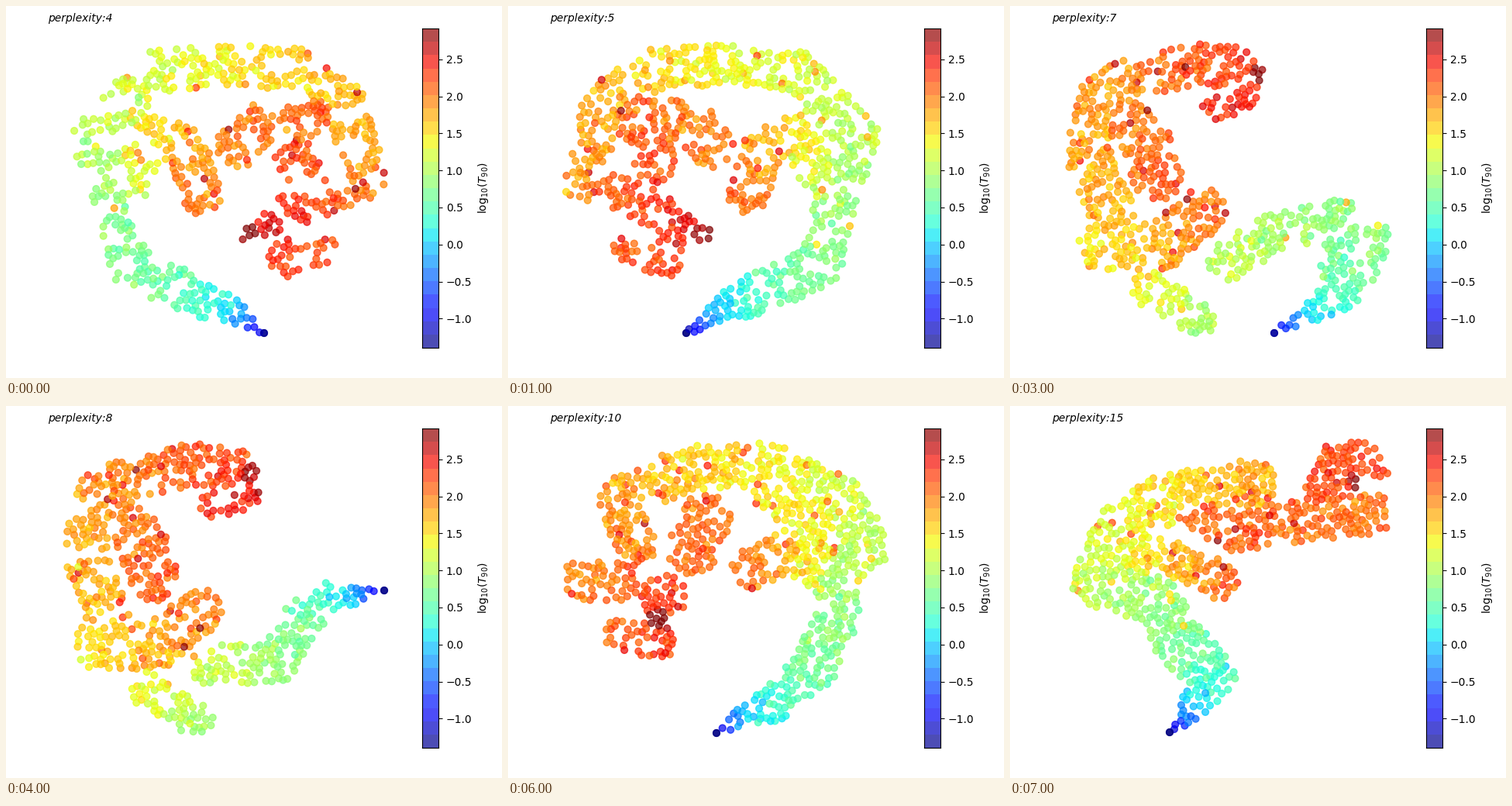
Write a matplotlib script that moves like this. It is 640 px wide and 480 px high and loops after 8000 ms.

```python
import numpy as np
import matplotlib.pyplot as plt
from matplotlib.animation import FuncAnimation

W, H = 640, 480
VMIN, VMAX = -1.3943, 2.9157
LEFT, RIGHT, TOP, BOTTOM = 75, 488, 47, 422
ALPHA = 0.7
GAP = 5.5  # smallest distance between dots
PERPLEXITIES = [4, 5, 6, 7, 8, 9, 10, 15]


def trace(pts):
    """Even steps along a polyline: x, y and distance from its start."""
    pts = np.array(pts, float)
    ends = np.r_[0, np.cumsum(np.hypot(*np.diff(pts, axis=0).T))]
    s = np.linspace(0, ends[-1], int(ends[-1] / 4) + 1)
    return np.interp(s, ends, pts[:, 0]), np.interp(s, ends, pts[:, 1]), s


def stroke(r, v0, v1, *pts):
    """A band of constant half-width whose value runs from v0 to v1."""
    x, y, s = trace(pts)
    return np.c_[x, y, np.full_like(s, r), v0 + (v1 - v0) * s / max(s[-1], 1)]


def tail(r, v1, *pts):
    """A band that widens from a tip of the shortest bursts."""
    x, y, s = trace(pts)
    v = 0.35 + (v1 - 0.35) * s / s[-1] - 1.75 * np.exp(-s / 40)
    return np.c_[x, y, r * np.minimum(1, 0.1 + s / 110), v]


def core(x, y):
    return stroke(12, 2.85, 2.85, (x, y))


def mirrored(nodes):
    return nodes * (-1, 1, 1, 1) + (LEFT + RIGHT, 0, 0, 0)


shape4 = np.vstack([
    tail(27, 1.85, (333, 422), (290, 392), (225, 365), (160, 335), (138, 240),
         (110, 170), (190, 85), (290, 75), (375, 82), (440, 125), (455, 185)),
    stroke(26, 1.15, 2.05, (160, 228), (190, 165), (235, 185), (253, 245)),
    stroke(28, 1.95, 2.2, (300, 180), (325, 150), (400, 140), (375, 200)),
    stroke(24, 1.95, 2.5, (470, 225), (415, 245), (345, 275)),
    stroke(16, 2.45, 2.2, (350, 280), (357, 335), (412, 315)),
    core(314, 293),
])
tail6 = np.vstack([
    tail(22, 0.8, (341, 422), (380, 400), (435, 365), (475, 305)),
    stroke(25, 0.6, 1.15, (425, 340), (427, 272), (345, 290), (280, 330)),
])
body6 = np.vstack([
    stroke(34, 1.3, 1.85, (210, 315), (120, 265), (108, 185), (140, 110)),
    stroke(38, 1.85, 2.15, (165, 110), (160, 165), (230, 180)),
    stroke(26, 1.6, 2.1, (170, 250), (255, 245), (300, 222)),
    stroke(30, 2.1, 2.25, (225, 130), (250, 75), (290, 95)),
    stroke(14, 2.35, 2.7, (295, 135), (358, 158)),
    stroke(26, 2.35, 2.2, (370, 125), (370, 90), (395, 110)),
    core(358, 160),
])
tail8 = tail(26, 1.15, (488, 238), (455, 243), (405, 250), (370, 290), (350, 330),
             (265, 335))
body8 = np.vstack([
    stroke(23, 1.35, 0.95, (180, 365), (245, 405)),
    stroke(30, 1.5, 2, (115, 310), (195, 310), (248, 265)),
    stroke(30, 1.7, 1.9, (130, 265), (100, 190), (120, 115), (150, 100)),
    stroke(32, 2, 2.15, (150, 150), (175, 175), (190, 220)),
    stroke(27, 2.05, 2.3, (190, 90), (235, 75), (290, 80)),
    stroke(17, 2.4, 2.4, (265, 130), (310, 118)),
    core(315, 88),
])
shape9 = np.vstack([
    tail(29, 1.65, (380, 405), (400, 388), (440, 350), (450, 265), (465, 215),
         (405, 175), (385, 100), (320, 85), (220, 95), (145, 160)),
    stroke(32, 1.35, 1.65, (375, 170), (330, 145), (230, 140)),
    stroke(20, 1.8, 2.05, (280, 175), (320, 225)),
    stroke(32, 1.75, 2.15, (98, 240), (125, 290), (165, 265), (230, 215)),
    stroke(28, 1.95, 2.35, (135, 370), (180, 340), (255, 330)),
    stroke(22, 2.35, 2.2, (270, 385), (225, 405)),
    core(283, 347),
])
shape10 = np.vstack([
    tail(28, 1.95, (269, 422), (295, 405), (345, 382), (395, 340), (425, 270),
         (420, 225), (465, 180), (430, 120), (335, 75), (230, 80), (145, 120),
         (165, 175)),
    stroke(30, 1.35, 1.5, (395, 205), (385, 140), (340, 105)),
    stroke(26, 2.05, 1.7, (315, 210), (360, 185)),
    stroke(32, 2.15, 2, (238, 185), (255, 145)),
    stroke(26, 1.9, 2.4, (95, 225), (150, 228), (205, 245)),
    stroke(21, 2.35, 2.15, (195, 305), (145, 295)),
    core(193, 272),
])
shape15 = np.vstack([
    tail(32, 1.75, (206, 421), (228, 398), (262, 350), (215, 300), (195, 255),
         (110, 225), (140, 160), (200, 120), (310, 100)),
    stroke(24, 1.45, 2.1, (175, 190), (230, 205), (270, 225)),
    stroke(27, 2.1, 2.05, (245, 135), (290, 160), (360, 150), (440, 140), (470, 140)),
    stroke(26, 2.25, 2.25, (405, 110), (430, 65), (475, 70)),
    core(445, 95),
])
SHAPES = {
    4: shape4,
    5: mirrored(shape4),
    6: np.vstack([tail6, body6]),
    7: np.vstack([tail6, body8]),
    8: np.vstack([tail8, body8]),
    9: shape9,
    10: shape10,
    15: shape15,
}


def ripple(rng, xy):
    """Smooth noise of unit variance, from plane waves in random directions."""
    a, phase = rng.uniform(0, 2 * np.pi, (2, 8))
    k = 2 * np.pi / rng.uniform(28, 48, 8)
    waves = xy[:, :1] * k * np.cos(a) + xy[:, 1:] * k * np.sin(a) + phase
    return np.sin(waves).sum(axis=1) / 2


def embed(perplexity):
    """Fill the shape with dots; low perplexity leaves more holes."""
    rng = np.random.default_rng(perplexity)
    x, y, r, v = SHAPES[perplexity].T
    xy = rng.uniform((LEFT, TOP), (RIGHT, BOTTOM), (5200, 2))
    score = np.hypot(xy[:, :1] - x, xy[:, 1:] - y) / r
    near = score.argmin(axis=1)
    solid = ripple(rng, xy) > -0.45 * np.sqrt(perplexity - 3)
    ends = (v[near] < 0.3) | (v[near] > 2.7)
    inside = (score.min(axis=1) < 1) & (solid | ends)

    tip = v.argmin()
    dots, nodes = [(x[tip], y[tip])] * 2, [tip] * 2
    for p, node in zip(xy[inside], near[inside]):
        if np.hypot(*(np.array(dots) - p).T).min() > GAP:
            dots.append(tuple(p))
            nodes.append(node)

    val = rng.normal(v[nodes], 0.12)
    odd = (rng.random(len(val)) < 0.06) & (val > 0.8) & (val < 2.2)
    val[odd] += rng.uniform(0.3, 0.9, odd.sum())
    order = rng.permutation(len(val))
    return np.array(dots)[order], val[order]


fig = plt.figure(figsize=(W / 100, H / 100), dpi=100, facecolor="white")
ax = fig.add_axes([0, 0, 1, 1])
ax.set(xlim=(0, W), ylim=(H, 0))
ax.axis("off")
scatter = ax.scatter([], [], c=[], s=40, cmap="jet", vmin=VMIN, vmax=VMAX, alpha=ALPHA)
title = ax.text(54.5, 20, "", fontsize=10, style="italic")

# Colour bar in even bands
bar = fig.add_axes([537 / W, 1 - 441 / H, 21 / W, 412 / H])
bands = (np.arange(24) + 0.5) / 24
bar.imshow(bands[:, None], cmap="jet", vmin=0, vmax=1, alpha=ALPHA, origin="lower",
           aspect="auto", interpolation="nearest", extent=(0, 1, VMIN, VMAX))
bar.set_xticks([])
bar.yaxis.tick_right()
bar.yaxis.set_label_position("right")
bar.set_yticks(np.arange(-1, 2.6, 0.5))
bar.set_ylabel(r"$\mathrm{log}_{10}(T_{90})$")

STATES = [embed(p) for p in PERPLEXITIES]


def draw(i):
    xy, val = STATES[i]
    scatter.set_offsets(xy)
    scatter.set_array(val)
    title.set_text(f"perplexity:{PERPLEXITIES[i]}")
    return scatter, title


anim = FuncAnimation(fig, draw, frames=len(STATES), interval=1000, repeat=True,
                     repeat_delay=0)
plt.show()
```
